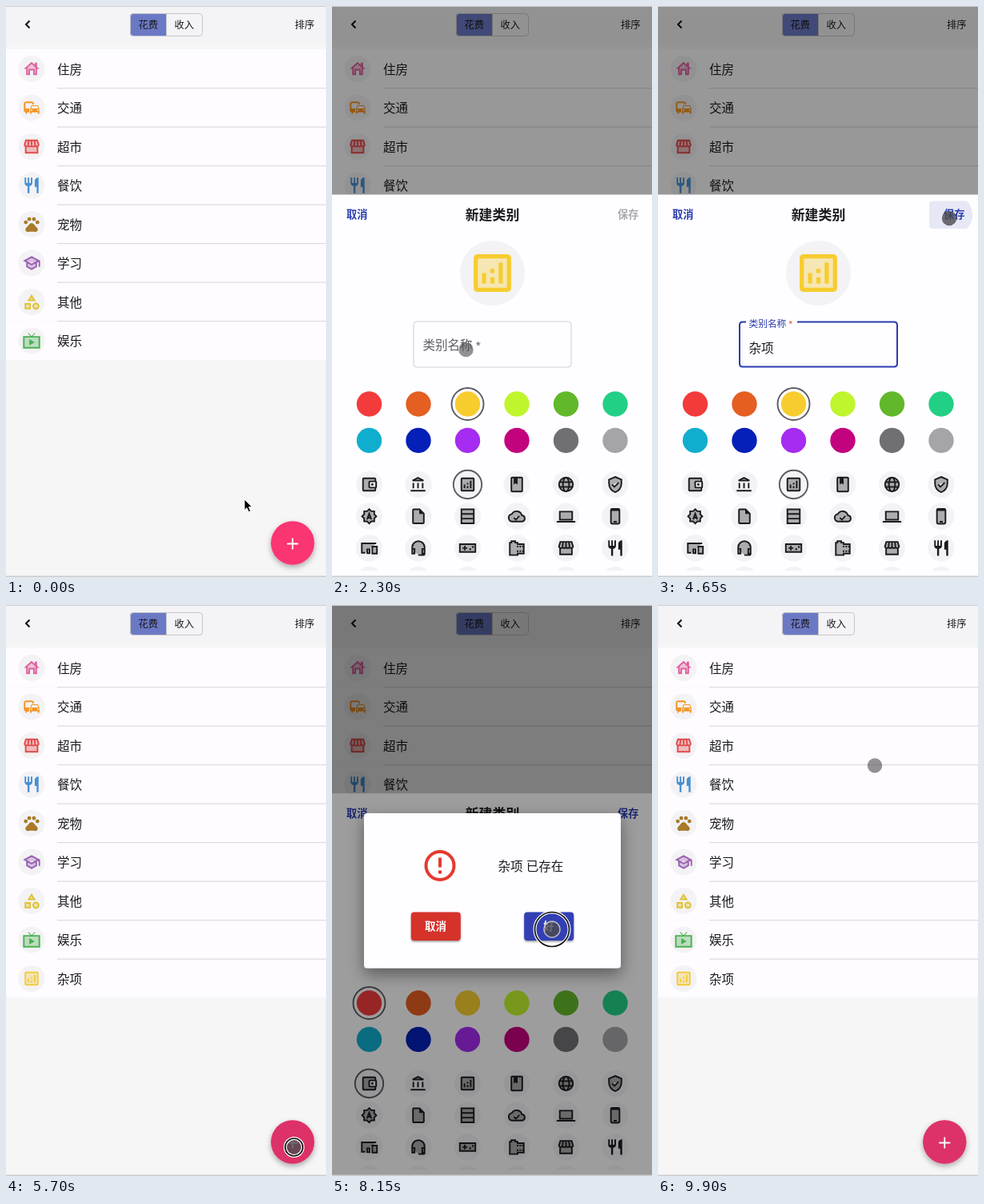
An HTML page that plays this animation: 400x713 px, repeating every 9950 ms.

```html
<!DOCTYPE html>
<html lang="zh">
<head>
<meta charset="utf-8">
<style>
html, body { margin: 0; width: 100%; height: 100%; overflow: hidden; background: #f6f6f7; }
svg { display: block; width: 400px; height: 713px; }
text { font-family: 'Liberation Sans', 'Noto Sans CJK SC', 'Noto Sans CJK', sans-serif; white-space: pre; }
</style>
</head>
<body>
<svg id="stage" viewBox="0 0 400 713"></svg>
<script>
const LOOP = 9950, BLUE = '#2a3caf', INK = '#1b1a1d';

// Icons on a 24-unit grid: [outlined shape, solid shape]
const ICONS = {
  house: ['M18 11V5h-1v4L12 4.4 4.6 11H6v8h3v-6h6v6h3v-8h1.4L17 9', ''],
  commute: ['', 'M12 4H5C3.3 4 2 5.3 2 7v8c0 1.7 1.3 3 3 3l-1 1v1h1l2-2h2v-5H4V6h9v2h2V7c0-1.7-1.3-3-3-3zM20.6 9.7c-.2-.4-.5-.7-1-.7h-7.2c-.5 0-.8.3-1 .7L10 13.8v5.5c0 .4.3.7.7.7h.6c.4 0 .7-.4.7-.8V18h8v1.2c0 .4.3.8.7.8h.6c.4 0 .7-.3.7-.7v-5.5zM12.4 10h7.2l1 3h-9.2zM12 14a1 1 0 0 1 0 2 1 1 0 0 1 0-2M20 14a1 1 0 0 1 0 2 1 1 0 0 1 0-2'],
  store: ['M4.4 11.5V20h15.2v-8.5M4.7 4h14.6l1.7 5.4a2.3 2.3 0 0 1-4.5.9 2.3 2.3 0 0 1-4.5 0 2.3 2.3 0 0 1-4.5 0A2.3 2.3 0 0 1 3 9.400zM8.3 4l-.8 6M12 4v6M15.700 4l.8 6', ''],
  food: ['', 'M11 9H9V2H7v7H5V2H3v7c0 2.100 1.700 3.800 3.750 4v9h2.500v-9C11.300 12.800 13 11.100 13 9V2h-2zM16 6v8h2.500v8H21V2c-2.800 0-5 2.200-5 4z'],
  paw: ['', 'M2 9.500a2.500 2.500 0 1 1 5 0 2.500 2.500 0 1 1-5 0M6.500 5.500a2.500 2.500 0 1 1 5 0 2.500 2.500 0 1 1-5 0M12.500 5.500a2.500 2.500 0 1 1 5 0 2.500 2.500 0 1 1-5 0M17 9.500a2.500 2.500 0 1 1 5 0 2.500 2.500 0 1 1-5 0M12 10.500c2.500 0 3.500 2.500 5.300 4.400 1.400 1.300 3 2.700 2.700 4.700-.7 2.300-2.200 2.600-4 2.300-2.700-.5-5.300-.5-8 0-1.800.3-3.300 0-4-2.300-.3-2 1.300-3.400 2.700-4.700C8.500 13 9.500 10.500 12 10.500z'],
  school: ['M3 9l9-4.900L21 9l-9 4.900zM6 11v5.600l6 3.300 6-3.300V11M22 9v8', ''],
  shapes: ['M12 4l-3.700 6h7.400zM4 14.500h6v6H4zM14 17.500a3.500 3.500 0 1 1 7 0 3.500 3.500 0 1 1-7 0', ''],
  tv: ['M2 7h20v14H2z', 'M9 10v8l7-4zM7.300 2.700L8 2l4 4 4-4 .7.7L12.400 7h-.8z'],
  chart: ['M5 4h14q1 0 1 1v14q0 1-1 1H5q-1 0-1-1V5q0-1 1-1z', 'M7 12h2v5H7zM15 7h2v10h-2zM11 14h2v3h-2zM11 10h2v2h-2z'],
  wallet: ['M20 8V5q0-1-1-1H5q-1 0-1 1v14q0 1 1 1h14q1 0 1-1v-3M13 8h7q1 0 1 1v6q0 1-1 1h-7q-1 0-1-1V9q0-1 1-1z', 'M14.500 12a1.500 1.500 0 1 1 3 0 1.500 1.500 0 1 1-3 0'],
  bank: ['M4.500 7h14l-7-3.700zM5.500 10v7M11.500 10v7M17.500 10v7M2 20h19', ''],
  book: ['M6 3h12q1 0 1 1v16q0 1-1 1H6q-1 0-1-1V4q0-1 1-1z', 'M8 3h5v9l-2.500-1.500L8 12z'],
  globe: ['M3 12a9 9 0 1 1 18 0 9 9 0 1 1-18 0M8 12a4 9 0 1 1 8 0 4 9 0 1 1-8 0M4 9h16M4 15h16', ''],
  shield: ['M12 2.200l8 3.600V11c0 5-3.400 9.600-8 10.900C7.400 20.600 4 16 4 11V5.800zM8 12l3 3 5.500-5.500', ''],
  auto: ['M12 2.800l2.700 2.700h3.800v3.800l2.700 2.700-2.700 2.700v3.800h-3.800L12 21.200l-2.700-2.700H5.500v-3.800L2.800 12l2.700-2.700V5.500h3.800zM9.300 16L12 8.500l2.700 7.500M10.300 13.800h3.400', ''],
  file: ['M6 3h7.500L19 8.500V20q0 1-1 1H6q-1 0-1-1V4q0-1 1-1z', 'M13 3v6h6z'],
  rows: ['M4 3h16v18H4zM4 9h16M4 15h16', ''],
  cloud: ['M19 18.800H6a4.900 4.900 0 0 1-.4-9.700 7 7 0 0 1 12.900 1.600 4.100 4.100 0 0 1 .5 8.100zM8.300 13.800l2.500 2.400 4.500-4.500', ''],
  laptop: ['M4 6h16v10.500H4zM0 19h24', ''],
  phone: ['M8 2.500h8q1.500 0 1.500 1.500v16q0 1.500-1.500 1.500H8q-1.500 0-1.500-1.500V4q0-1.500 1.500-1.500z', 'M7 2h10v3H7zM10 18h4v2h-4z'],
  devices: ['M7 18H2.500V6H21M16 10h6v9h-6zM9.500 13.500h3v5h-3z', ''],
  headset: ['M4 14v-3a8 8 0 0 1 16 0v8q0 2-2 2h-6M4 13h3v6H4zM17 13h3v6h-3z', ''],
  game: ['M2 7h20v10H2z', 'M7.500 9h2v2h2v2h-2v2h-2v-2h-2v-2h2zM14 13.500a1.300 1.300 0 1 1 2.600 0 1.300 1.300 0 1 1-2.600 0M17.500 10.500a1.300 1.300 0 1 1 2.600 0 1.300 1.300 0 1 1-2.600 0'],
  roll: ['M3 5h2V3h5v2h3v2h8v12h-8v2H3z', 'M12 9h2v2h-2zM15.500 9h2v2h-2zM19 9h2v2h-2zM12 15h2v2h-2zM15.500 15h2v2h-2zM19 15h2v2h-2z']
};

const icon = (name, x, y, color, k = 1) => {
  const [line, solid] = ICONS[name];
  return `<g transform="translate(${x - 12 * k} ${y - 12 * k}) scale(${k})" fill="${color}">` +
    (line && `<path d="${line}" fill-opacity=".33" stroke="${color}" stroke-width="2"/>`) +
    (solid && `<path d="${solid}" fill-rule="evenodd"/>`) + '</g>';
};
// Text centred vertically on y
const text = (s, x, y, size, color = INK, extra = '') =>
  `<text x="${x}" y="${y + size * .37}" font-size="${size}" fill="${color}" ${extra}>${s}</text>`;
const rect = (x, y, w, h, fill, extra = '') =>
  `<rect x="${x}" y="${y}" width="${w}" height="${h}" fill="${fill}" ${extra}/>`;
const disc = (x, y, r, fill, extra = '') =>
  `<circle cx="${x}" cy="${y}" r="${r}" fill="${fill}" ${extra}/>`;
const BOLD = 'font-weight="700"';

const ITEMS = [
  ['住房', 'house', '#e0609f'], ['交通', 'commute', '#f39422'], ['超市', 'store', '#e34b4b'],
  ['餐饮', 'food', '#4a90d2'], ['宠物', 'paw', '#a87a2a'], ['学习', 'school', '#9a62b2'],
  ['其他', 'shapes', '#dfc233'], ['娱乐', 'tv', '#4bb052'], ['杂项', 'chart', '#f2cb3c']
];
const COLORS = ['#f33b3b', '#e55e22', '#f7cc2f', '#bff52d', '#62b82a', '#22d085',
  '#10aece', '#0420b8', '#a52cf0', '#c3027e', '#706f72', '#a5a4a8'];
const PICKS = ['wallet', 'bank', 'chart', 'book', 'globe', 'shield', 'auto', 'file', 'rows', 'cloud', 'laptop', 'phone',
  'devices', 'headset', 'game', 'roll', 'store', 'food'];
const colX = i => 46.5 + 61.5 * (i % 6);
const rowY = (i, y, step) => y + step * Math.floor(i / 6);

function listRow([name, pic, color], i) {
  const y = 78.5 + 48.5 * i;
  return `<g ${i == 8 ? 'id="added"' : ''}>` + rect(0, y - 24.5, 400, 48.5, '#fefcff') +
    (i ? rect(64, y - 25, 336, 1.2, '#dddbdf') : '') +
    disc(32, y, 16.5, '#f3f2f4') + icon(pic, 32, y, color, .97) + text(name, 64, y + .3, 15.5) + '</g>';
}

const page = rect(0, 0, 400, 713, '#f6f6f7') + rect(0, 0, 400, 46, '#f4f3f5') +
  '<path d="M29.500 18.500L25 23l4.500 4.500" fill="none" stroke="#111" stroke-width="2"/>' +
  '<path d="M200.500 9.500H159q-4 0-4 4V33.500q0 4 4 4h41.500z" fill="#6b79c5"/>' +
  rect(155.5, 9.5, 90, 28, 'none', 'rx="4" stroke="#c6c5c9"') + rect(200, 10, 1, 27, '#c6c5c9') +
  text('花费', 165.5, 23.5, 12.3) + text('收入', 210.5, 23.5, 12.3) + text('排序', 361, 23.5, 12.3) +
  ITEMS.map(listRow).join('') +
  '<g filter="url(#drop)">' + disc(358.3, 670.5, 27.2, '#f93572', 'id="fab"') + '</g>' +
  '<path d="M351.300 671.500h14M358.300 664.500v14" stroke="#fff" stroke-width="1.800"/>';

const sheet = rect(0, 235.5, 400, 480, '#fefdff') +
  '<path id="hover" d="M343 243.500H386C391 249 393 255 393 261S391 273 386 278H343q-4 0-4-4V247.500q0-4 4-4z" fill="#e7e8f5"/>' +
  text('取消', 18, 260.5, 13.2, BLUE, BOLD) + text('新建类别', 200.500, 260.5, 16.9, INK, BOLD + ' text-anchor="middle"') +
  text('保存', 357, 260.5, 13.2, '#aaa9ac', BOLD + ' id="save"') +
  disc(200.5, 333.5, 40.6, '#f3f2f4') +
  `<g id="bigRed">${icon('wallet', 200.5, 333.5, COLORS[0], 2.6)}</g>` +
  `<g id="bigYellow">${icon('wallet', 200.5, 333.5, COLORS[2], 2.6)}</g>` +
  `<g id="bigChart">${icon('chart', 200.5, 333.5, COLORS[2], 2.6)}</g>` +
  rect(102, 394, 197, 57, 'none', 'id="idle" rx="4" stroke="#cfced2"') +
  `<path id="focus" d="M110 394.500H106q-4 0-4 4V446.500q0 4 4 4H295q4 0 4-4V398.500q0-4-4-4H174" fill="none" stroke="${BLUE}" stroke-width="2"/>` +
  '<text id="label" x="113.500">类别名称 <tspan id="star">*</tspan></text>' +
  `<text id="value" x="113.500" y="433" font-size="15.500" fill="${INK}"></text>` +
  rect(113.5, 435, 0, 1, INK, 'id="under"') + rect(170, 418.5, 1.2, 18, BLUE, 'id="caret"') +
  COLORS.map((c, i) => disc(colX(i), rowY(i, 497, 45.5), 15.7, c)).join('') +
  '<g clip-path="url(#cut)">' +
  Array.from({length: 24}, (_, i) => disc(colX(i), rowY(i, 597.5, 39.7), 16.6, '#f3f2f4')).join('') +
  PICKS.map((p, i) => icon(p, colX(i), rowY(i, 597.5, 39.7), INK, .97)).join('') + '</g>' +
  disc(46.5, 497, 20, 'none', 'id="ringC" stroke="#5d5c60" stroke-width="1.900"') +
  disc(46.5, 597.5, 17.7, 'none', 'id="ringI" stroke="#5d5c60" stroke-width="1.900"');

const words = (list, step) => list.map((w, i) =>
  text(`${i + 1}.${w}`, 111 + i * step + (i && step > 50 ? -2 : 0), 463, 17.3, i ? '#3c3b3f' : '#e8701c')).join('');
const ime = '<g id="ime"><g filter="url(#drop)">' + rect(88, 442, 320, 42, '#fefdff', 'id="bar"') + '</g>' +
  [0, 1, 2, 3].map(i => disc(90.5, 448 + i * 10, 2, '#c9c8cc')).join('') +
  rect(98, 442, 1, 42, '#f0c9ab') + rect(101, 442, 1, 42, '#ececee') +
  `<g id="one">${words(['杂', '咋', '砸', '扎', '匝'], 44)}</g>` +
  `<g id="two">${words(['杂项', '咋想', '咋像', '砸向', '咋'], 59.7)}` +
  '<path d="M395 460l5 5 5-5" fill="none" stroke="#e8701c" stroke-width="1.600"/></g></g>';

const button = (x, fill, s, tx) => '<g filter="url(#soft)">' + rect(x, 383.5, 62, 35.5, fill, 'rx="4"') + '</g>' +
  text(s, tx, 401, 13.5, '#fff', BOLD);
const dialog = '<g id="dialog">' + rect(0, 0, 400, 235.5, '#000', 'opacity=".18"') + rect(0, 235.5, 400, 478, '#000', 'opacity=".38"') +
  '<g filter="url(#deep)">' + rect(40, 260, 321, 193.5, '#fefdff', 'rx="4"') + '</g>' +
  disc(135, 325.5, 17.5, 'none', 'stroke="#e5392f" stroke-width="4"') +
  '<path d="M135 315.500v12M135 331.500v4" stroke="#e5392f" stroke-width="4"/>' +
  text('杂项 已存在', 207.5, 326, 15.5) +
  button(98.8, '#d5302c', '取消', 116) + button(240.2, '#3040b4', '好', 264.3) + '</g>';

const pointer = '<path id="arrow" d="M0 0v13.500l3-2.800 2.300 5 2.500-1.100-2.300-4.900H9.700z" fill="#000" stroke="#fff" stroke-width="1"/>' +
  '<g id="touch">' + disc(0, 0, 9.2, '#4b4a4e', 'id="dot"') +
  '<g id="wave" fill="none">' + disc(0, 0, 10, 'none', 'stroke="#b9b8bc" stroke-width="1.500"') +
  disc(0, 0, 20, 'none', 'id="wave1" stroke="#fff" stroke-width="4"') +
  disc(0, 0, 20, 'none', 'id="wave2" stroke="#111" stroke-width="1.700"') + '</g></g>';

const shadow = (id, dy, blur, a) => `<filter id="${id}" x="-30%" y="-30%" width="160%" height="170%">` +
  `<feDropShadow dx="0" dy="${dy}" stdDeviation="${blur}" flood-color="#000" flood-opacity="${a}"/></filter>`;
document.getElementById('stage').innerHTML =
  '<defs>' + shadow('drop', 3, 3.5, .32) + shadow('soft', 1.5, 1.2, .4) + shadow('deep', 8, 10, .42) +
  '<clipPath id="cut"><path d="M0 570h400v135H0z"/></clipPath></defs>' +
  page + rect(0, 0, 400, 713, '#000', 'id="dim"') + `<g id="sheet">${sheet}</g>` + ime + dialog +
  rect(0, 0, 400, 1, '#cfced1') + rect(0, 711.5, 400, 1.5, '#cbcacd') + `<g id="pointer">${pointer}</g>`;

const $ = {};
document.querySelectorAll('[id]').forEach(e => $[e.id] = e);
const set = (e, o) => { for (const k in o) e.setAttribute(k, o[k]); };
const show = (e, on) => e.style.display = on ? '' : 'none';
const ramp = (t, a, b) => Math.max(0, Math.min(1, (t - a) / (b - a)));
const smooth = p => p * p * (3 - 2 * p);
const out = p => 1 - (1 - p) ** 3;
const within = (t, a, b) => t >= a && t < b;

// Pointer stops: time, x, y
const PATH = [[0, 298, 616], [100, 298, 616], [450, 358, 673], [700, 358, 673], [1400, 169, 497], [1500, 169, 497],
  [1750, 169.5, 597.5], [1900, 169.5, 597.5], [2300, 167.5, 429], [3650, 167.5, 429], [4500, 364, 265], [4800, 364, 265],
  [5500, 360, 677], [5800, 360, 677], [6350, 167.5, 429], [7220, 167.5, 429], [7560, 364, 263], [7700, 364, 263],
  [8030, 275, 405], [8250, 275, 405], [8640, 31, 261], [8850, 31, 261], [9850, 271, 200.5], [LOOP, 271, 200.5]];
const CLICKS = [560, 1430, 1800, 2380, 4670, 5690, 6400, 7600, 8080, 8700];
const TYPED = ['z', 'za', "za'x", "za'xi", "za'xia", "za'xian", "za'xiang"];

function place(t) {
  const i = Math.max(1, PATH.findIndex(p => p[0] > t));
  const a = PATH[i - 1], b = PATH[i], p = smooth(ramp(t, a[0], b[0]));
  return [a[1] + (b[1] - a[1]) * p, a[2] + (b[2] - a[2]) * p];
}

function render(t) {
  const again = t > 5300;
  // Times for the first and the second visit to the sheet
  const [open, focus, type, commit, shut] = again ? [5790, 6420, 6560, 7160, 8760] : [650, 2400, 2550, 3420, 4750];
  const up = out(ramp(t, open, open + 240)) * (1 - smooth(ramp(t, shut, shut + 220)));
  show($.added, t >= 4740);
  set($.fab, {fill: t < 380 ? '#f93572' : '#dd3067'});
  set($.dim, {opacity: .4 * up});
  show($.sheet, up > 0);
  set($.sheet, {transform: `translate(0 ${478 * (1 - up)})`});

  const yellow = !again && t >= 1450, chart = !again && t >= 1820;
  show($.bigRed, !yellow);
  show($.bigYellow, yellow && !chart);
  show($.bigChart, chart);
  set($.ringC, {cx: colX(yellow ? 2 : 0)});
  set($.ringI, {cx: colX(chart ? 2 : 0)});

  const lit = t >= focus, rise = out(ramp(t, focus, focus + 180));
  show($.focus, lit);
  show($.idle, !lit);
  set($.label, {y: 429.3 - 28 * rise, 'font-size': 15.5 - 3.8 * rise, fill: lit ? BLUE : '#5f5e62'});
  set($.star, {fill: lit ? '#e5392f' : '#5f5e62'});

  const n = Math.floor((t - type) / (again ? 70 : 100));
  const composing = t >= type && t < commit, done = t >= commit;
  const value = done ? '杂项' : composing ? TYPED[Math.min(6, n)] : '';
  if ($.value.textContent !== value) $.value.textContent = value;
  const w = value && up > 0 ? $.value.getComputedTextLength() : 0;
  set($.under, {width: composing ? w : 0});
  set($.caret, {x: 113.5 + w});
  show($.caret, lit && t < commit + 200 && (composing || (t - focus) % 1000 < 500));
  show($.ime, composing);
  show($.one, n < 2);
  show($.two, n >= 2);
  set($.bar, {width: n < 2 ? 256 : 320});
  set($.save, {fill: done ? BLUE : '#aaa9ac'});
  show($.hover, within(t, 4420, 5000) || within(t, 7500, 7720));

  const pop = smooth(ramp(t, 7680, 7880)) * (1 - smooth(ramp(t, 8220, 8400)));
  show($.dialog, pop > 0);
  set($.dialog, {opacity: pop});

  const [x, y] = place(t);
  set($.pointer, {transform: `translate(${x} ${y})`});
  show($.arrow, t < 300);
  show($.touch, t >= 300 && !within(t, type, again ? 7220 : 3650));
  const hit = CLICKS.find(c => within(t, c - 60, c + 220));
  const age = t - hit;
  set($.dot, {opacity: hit ? .8 : .6});
  show($.wave, age >= 0);
  if (age >= 0) {
    const r = Math.min(21.5, 9 + age * .18);
    set($.wave1, {r});
    set($.wave2, {r});
    set($.wave, {opacity: 1 - ramp(age, 110, 220)});
  }
}

function tick(now) {
  render(now % LOOP);
  requestAnimationFrame(tick);
}
render(0);
requestAnimationFrame(tick);
</script>
</body>
</html>
```
